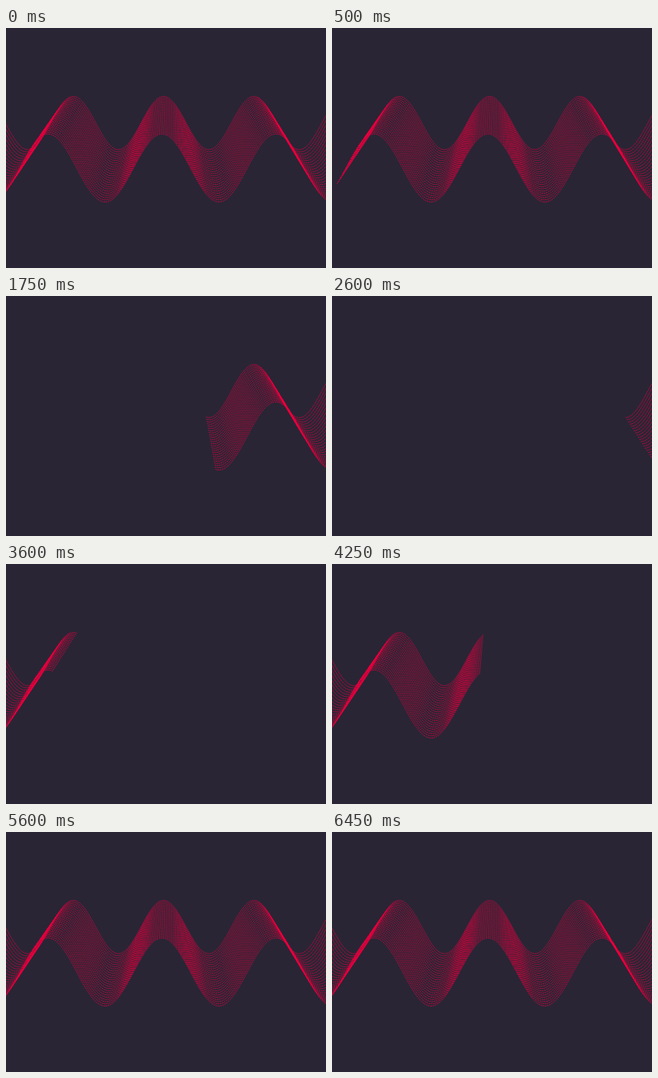
An HTML page with a canvas for the animation above (6.5 s loop, 400x300 px).

```html
<!DOCTYPE html>
<html lang="en">
<head>
<meta charset="utf-8">
<title>Wave ribbon</title>
<style>
html, body { margin: 0; width: 100%; height: 100%; overflow: hidden; background: #292535; }
canvas { display: block; width: 400px; height: 300px; }
</style>
</head>
<body>
<canvas id="stage" width="400" height="300"></canvas>
<script>
const ctx = document.getElementById('stage').getContext('2d');
const LOOP = 6500, LINES = 25, PITCH = 7, DASH = 4.6;
const START = -560, END = 1700;
const RAD = Math.PI / 180;

// Wave angle in degrees for each unit of distance along the curve
const angles = [0];
for (let s = 1; s <= END + 10; s++) {
  const a = angles[s - 1];
  angles.push(a + 1 / Math.hypot(1, 1.9 * Math.sin((a + 0.3) * RAD)));
}

function angleAt(s) {
  const d = Math.abs(s), i = Math.floor(d);
  return Math.sign(s) * (angles[i] + (angles[i + 1] - angles[i]) * (d - i));
}

const mix = (a, b, u) => a + (b - a) * u;

const lines = Array.from({ length: LINES }, (_, i) => {
  const u = i / (LINES - 1);
  return {
    x: mix(197, 195, u),
    step: mix(0.314, 0.395, u),
    y: mix(118.8, 175, u),
    amp: mix(33.3, 42.5, u)
  };
});

const tailKeys = [[0, -640], [700, -40], [1100, 330], [1400, 600], [2100, 1130], [2600, 1460], [2800, 1640]];

function tailAt(t) {
  for (let i = 1; i < tailKeys.length; i++) {
    const [t0, s0] = tailKeys[i - 1], [t1, s1] = tailKeys[i];
    if (t <= t1) return mix(s0, s1, (t - t0) / (t1 - t0));
  }
  return END;
}

const headAt = t => 184 + 0.835 * (t - 3800);

function draw(t) {
  const leaving = t < 2950;
  const head = headAt(t);
  const from = leaving ? Math.max(START, tailAt(t)) : START;
  const to = leaving ? END : Math.min(END, head);
  const shift = ((head % PITCH) + PITCH) % PITCH;

  ctx.fillStyle = '#292535';
  ctx.fillRect(0, 0, 400, 300);
  ctx.strokeStyle = '#e6003e';
  ctx.lineWidth = 0.8;

  const dashes = [];
  for (let s = Math.ceil((from - shift) / PITCH) * PITCH + shift; s + DASH <= to; s += PITCH) {
    const a = angleAt(s), b = angleAt(s + DASH);
    dashes.push([a, Math.cos(a * RAD), b, Math.cos(b * RAD)]);
  }
  for (const l of lines) {
    ctx.beginPath();
    for (const [a, ca, b, cb] of dashes) {
      ctx.moveTo(l.x + l.step * (a - 360), l.y - l.amp * ca);
      ctx.lineTo(l.x + l.step * (b - 360), l.y - l.amp * cb);
    }
    ctx.stroke();
  }
}

const begin = performance.now();
function tick() {
  draw((performance.now() - begin) % LOOP);
  requestAnimationFrame(tick);
}
tick();
</script>
</body>
</html>
```
